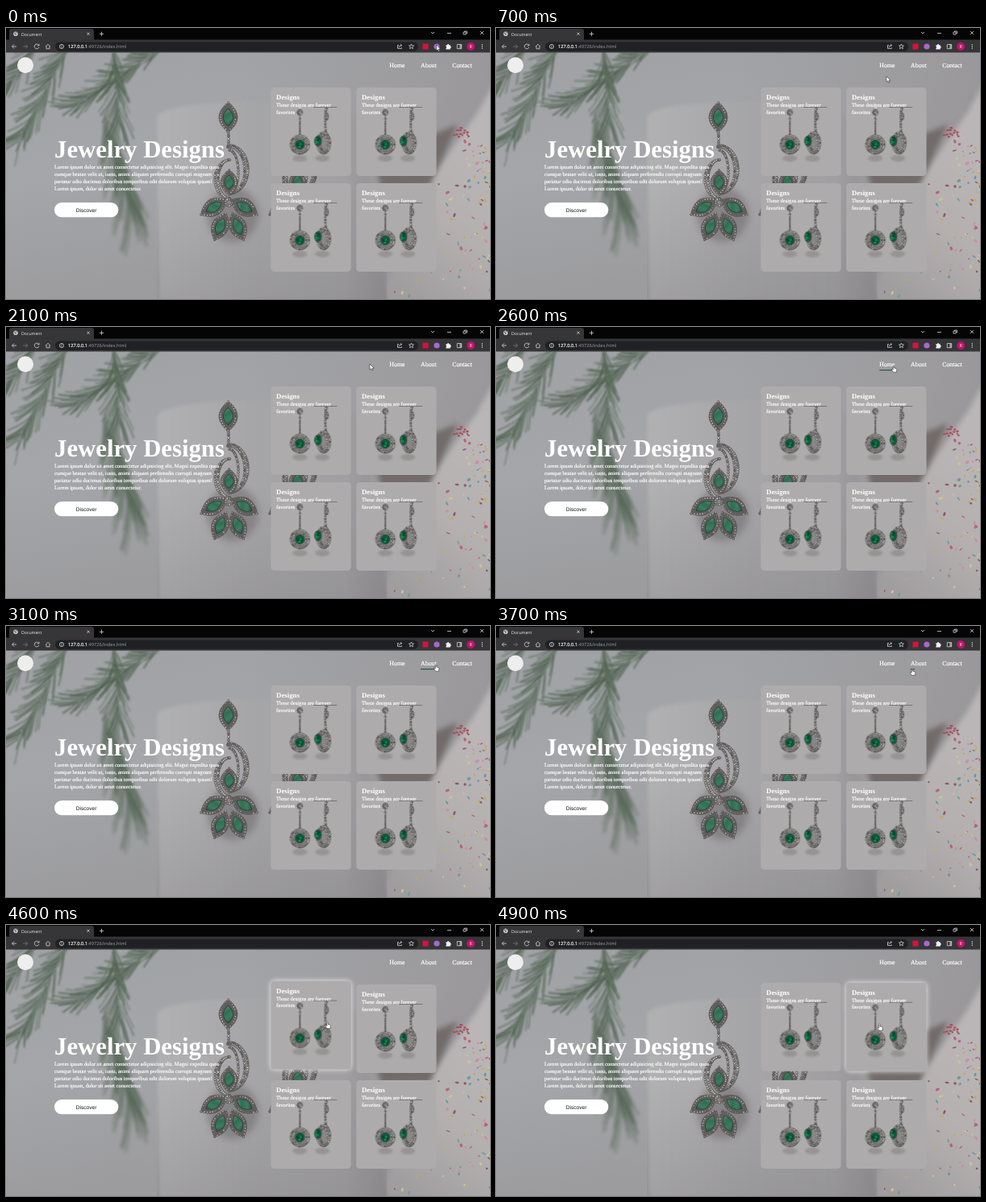
Write an HTML page with a canvas that moves like this. It is 600 px wide and 337 px high and loops after 5000 ms.

```html
<!DOCTYPE html>
<html lang="en">
<head>
<meta charset="utf-8">
<title>Jewelry Designs</title>
<style>
  html, body { margin: 0; width: 100%; height: 100%; overflow: hidden; background: #000; }
  canvas, svg { position: absolute; left: 0; top: 0; width: 600px; height: 337px; display: block; }
  text { text-rendering: geometricPrecision; white-space: pre; }
  .serif { font-family: "Liberation Serif", "Times New Roman", serif; fill: #fff; }
  .small { stroke: #fff; stroke-width: .18; }
  .ui { font-family: "Open Sans", "Noto Sans", sans-serif; fill: #f1f2f3; }
  .bold { font-weight: 700; }
  .line { fill: none; stroke: #d4d5d7; stroke-width: .8; }
</style>
</head>
<body>
<canvas id="page" width="600" height="337"></canvas>
<svg viewBox="0 0 600 337" width="600" height="337">
  <!-- browser frame -->
  <rect width="600" height="15" fill="#050506"/>
  <rect x="4" y="1" width="105" height="18" rx="3" fill="#363537"/>
  <rect y="14.5" width="600" height="16" fill="#363537"/>
  <circle cx="12" cy="7.2" r="2.8" fill="#c8cacd"/>
  <path d="M10 6l2 1v2M12.5 5l1.5 1.5" stroke="#363537" stroke-width=".8" fill="none"/>
  <text class="ui" x="19" y="9.5" font-size="5.2">Document</text>
  <path class="line" d="M100.4 5.6l3.2 3.2m0-3.2l-3.2 3.2M118.5 4.7v5.2M115.9 7.3h5.2"/>
  <path class="line" d="M527 5l2 2 2-2M547 6.5h5M567 5h3v3h-3zM568.5 5v-1h3v3h-1M588 4l4 4m0-4l-4 4"/>
  <path class="line" d="M13 23H7.5m2.6-2.6L7.5 23l2.6 2.6M40.5 21.2A2.9 2.9 0 1 0 40.9 24M41 19.8v2.1h-2.1M49 23.2l3-2.9 3 2.9M50 22.7v3.1h4v-3.1"/>
  <path class="line" style="stroke:#77797d" d="M21.3 23h5.5m-2.6-2.6l2.6 2.6-2.6 2.6"/>
  <rect x="61" y="17.4" width="450" height="11.4" rx="5.7" fill="#202124"/>
  <circle class="line" cx="69" cy="23" r="2.6"/>
  <path class="line" d="M69 22.6v1.9M69 21.2v.8"/>
  <text class="ui" x="77" y="25.1" font-size="5.7"><tspan stroke="#f1f2f3" stroke-width=".2">127.0.0.1</tspan><tspan fill="#9aa0a6">:49726/index.html</tspan></text>
  <path class="line" d="M487 21.4h-1.5v4h5v-1M487 24q.5-2.5 3.5-2.5m-1.3-1.4l1.5 1.4-1.5 1.4M502.5 20l1 2h2l-1.6 1.5.5 2.2-1.9-1.2-1.9 1.2.5-2.2-1.6-1.5h2z"/>
  <rect x="516.5" y="19.5" width="7" height="7" fill="#d8123f"/>
  <circle cx="534" cy="23" r="3.6" fill="#a767cf"/>
  <path d="M545.4 21.2h1.6a1.1 1.1 0 0 1 2.2 0h1.6v1.5a1.1 1.1 0 0 1 0 2.2v1.5h-5.4v-1.6a1.1 1.1 0 0 0 0-2.1z" fill="#f0f1f2"/>
  <path class="line" d="M559.3 20.5h5.4v5.2h-5.4zM563 20.5v5.2M564 20.5v5.2"/>
  <circle cx="576.2" cy="23" r="5" fill="#c5116d"/>
  <text class="ui" x="576.2" y="25" font-size="5.4" text-anchor="middle">R</text>
  <path d="M590.3 20.8v5" stroke="#d4d5d7" stroke-width="1.4" stroke-linecap="round" stroke-dasharray="0 2.2"/>

  <!-- page -->
  <circle cx="24" cy="46.3" r="10" fill="#eee"/>
  <g id="nav"></g>
  <text class="serif bold" x="60" y="161.3" font-size="30.75">Jewelry Designs</text>
  <g id="intro"></g>
  <rect x="60" y="217" width="79.3" height="18.3" rx="9.1" fill="#fff"/>
  <text x="99.6" y="228.6" font-size="6.6" text-anchor="middle" font-family="Liberation Sans, Arial, sans-serif" fill="#111">Discover</text>
  <g id="labels"></g>
  <g id="cursor" stroke="#222" stroke-width=".55" stroke-linejoin="round" fill="#fff">
    <path id="arrow" d="M0 0V7.2L1.7 5.7 2.8 8.2 4 7.7 2.9 5.2H5.1Z"/>
    <path id="hand" d="M-.7.6Q0-.6.7.6V3L3 3.6Q4 3.9 3.9 5L3.4 8.2H-.6L-2.6 5Q-2.8 4-1.8 4.2L-.7 5Z"/>
  </g>
</svg>
<script>
const LOOP = 5000, STEP = 100, TAU = Math.PI * 2;
const $ = id => document.getElementById(id);

// ---------- helpers ----------
let seed = 7;
function rnd(a = 0, b = 1) {
  seed = (seed * 16807) % 2147483647;
  return a + (b - a) * seed / 2147483647;
}
function paint(w, h, draw) {
  const c = document.createElement('canvas');
  c.width = w; c.height = h;
  draw(c.getContext('2d'));
  return c;
}
function svg(tag, attrs, parent, text) {
  const el = document.createElementNS('http://www.w3.org/2000/svg', tag);
  for (const k in attrs) el.setAttribute(k, attrs[k]);
  if (text) el.textContent = text;
  return parent.appendChild(el);
}
function oval(g, x, y, rx, ry, fill, rot = 0) {
  g.fillStyle = fill;
  g.beginPath(); g.ellipse(x, y, rx, ry, rot, 0, TAU); g.fill();
}
function ramp(g, x0, y0, x1, y1, ...stops) {
  const r = g.createLinearGradient(x0, y0, x1, y1);
  stops.forEach((c, i) => r.addColorStop(i / (stops.length - 1), c));
  return r;
}
function shape(g, d, fill) {
  g.fillStyle = fill;
  g.fill(new Path2D(d));
}

// ---------- jewels ----------
function stone(g, x, y, r) {
  const v = rnd(95, 205) | 0;
  oval(g, x, y, r, r, '#5b5857');
  oval(g, x - .2, y - .2, r * .6, r * .6, `rgb(${v},${v - 2},${v - 3})`);
}
function ring(g, x, y, rx, ry, r) {
  const n = Math.round((rx + ry) * 2 / r);
  for (let i = 0; i < n; i++) stone(g, x + rx * Math.cos(i / n * TAU), y + ry * Math.sin(i / n * TAU), r);
}
// string of stones from y0 to y1, bulging sideways by w
function bow(g, x, y0, y1, w, r) {
  const n = Math.ceil((y1 - y0 + Math.abs(w)) / r / 1.5);
  for (let i = 0; i <= n; i++) {
    const s = (1 - Math.cos(i / n * Math.PI)) / 2;
    stone(g, x + w * Math.sin(i / n * Math.PI), y0 + (y1 - y0) * s, r);
  }
}
function leaf(g, l, w, fill) {
  shape(g, `M0 ${-l}Q${2 * w} 0 0 ${l}Q${-2 * w} 0 0 ${-l}`, fill);
}
function gem(g, x, y, l, w, angle = 0) {
  g.save();
  g.translate(x, y); g.rotate(angle);
  leaf(g, l + 1, w + 1, '#625e5d');
  for (let i = 0; i <= 12; i++) {
    const s = i / 12, b = 3.4 * w * s * (1 - s);
    for (const side of [-1, 1]) stone(g, side * b, (2 * s - 1) * l, 1.4);
  }
  leaf(g, l * .64, w * .6, '#284438');
  leaf(g, l * .57, w * .52, ramp(g, -w / 2, -l / 2, w / 2, l / 2, '#5d8f78', '#2f6e51', '#3d7c60', '#265541'));
  g.restore();
}
function earring(g, dx) {
  g.save();
  g.translate(dx, 0);
  g.filter = 'blur(4px)';
  oval(g, 281, 232, 32, 34, 'rgba(95,93,97,.45)');
  g.filter = 'none';
  bow(g, 275, 128, 148, 1, 1.9);
  for (const w of [23, 19, 11]) bow(g, 277, 146 + (23 - w) / 2, 206, w, 1.8);
  for (const w of [-18, -14]) bow(g, 277, 164, 212, w, 1.8);
  gem(g, 275.5, 111, 18, 11);
  gem(g, 276.5, 192, 15, 10);
  for (const side of [-1, 1]) {
    gem(g, 276.5 + side * 19, 223, 18, 10, side * -1.05);
    gem(g, 276.5 + side * 11, 247, 18, 10, side * -.4);
  }
  ring(g, 276.5, 217, 4, 4, 1.8);
  g.restore();
}

// ---------- backdrop ----------
// pine branch: x, y, direction in degrees, length, needle length
function frond(g, x, y, deg, len, needle) {
  const dir = deg * Math.PI / 180;
  for (let s = 0; s < len; s += 2.2) {
    const a = dir + (rnd() < .5 ? -1 : 1) * rnd(.3, 1.4) * 16 / needle;
    const l = needle * rnd(.7, 1.15), v = rnd(-16, 20);
    const px = x + Math.cos(dir) * s, py = y + Math.sin(dir) * s;
    g.strokeStyle = `rgba(${86 + v},${103 + v},${86 + v},.72)`;
    g.lineWidth = rnd(1.1, 2.5);
    g.beginPath(); g.moveTo(px, py);
    g.quadraticCurveTo(px + Math.cos(a) * l / 2, py + Math.sin(a) * l / 2,
                       px + Math.cos(a + .12) * l, py + Math.sin(a + .12) * l);
    g.stroke();
  }
}
const photo = paint(600, 337, g => {
  g.fillStyle = ramp(g, 0, 31, 60, 337, '#9fa1a5', '#a5a6aa', '#9c9c9f');
  g.fillRect(0, 0, 600, 337);
  g.fillStyle = ramp(g, 300, 0, 600, 60, 'rgba(150,148,150,0)', 'rgba(150,147,150,.75)');
  g.fillRect(0, 0, 600, 337);

  // paper, and the dark thing lying on it
  g.filter = 'blur(3px)';
  shape(g, 'M610 60L584 106 525 190 460 345H610Z', ramp(g, 470, 310, 600, 150, '#a09d9f', '#b4b0b0', '#bab6b7'));
  shape(g, 'M560 120L530 132 460 180 466 200 525 196Z', '#726b69');

  // cup
  g.filter = 'blur(2px)';
  shape(g, 'M187 112C189 92 300 90 345 90S438 98 438 116L474 345H190Z',
    ramp(g, 186, 0, 478, 0, '#b1b0b2', '#acabad', '#a6a5a7', '#a3a2a4', '#a09fa1', '#8e8c90'));
  g.filter = 'none';
  g.fillStyle = ramp(g, 0, 200, 0, 337, 'rgba(120,118,122,0)', 'rgba(120,118,122,.28)');
  g.fillRect(187, 200, 285, 137);

  // pine, the hanging branch out of focus
  g.filter = 'blur(2px)';
  frond(g, 122, 110, 74, 120, 58);
  g.filter = 'blur(.9px)';
  frond(g, 78, 22, 118, 135, 36);
  frond(g, 196, 22, 146, 135, 34);
  frond(g, 40, 18, 125, 80, 34);
  frond(g, 132, 26, 84, 95, 38);

  // confetti and berries
  g.filter = 'blur(.6px)';
  const hues = ['#b9637a', '#c4ab5e', '#6a9a9c', '#8f5a66', '#c98fa2', '#cdc48f'];
  for (let i = 0; i < 90; i++) {
    const y = rnd(140, 337), x = 600 - rnd() * rnd() * (40 + (y - 140) * .5);
    oval(g, x, y, rnd(.8, 3), rnd(.7, 1.8), hues[i % 6], rnd(0, 3));
  }
  for (let i = 0; i < 14; i++) oval(g, rnd(548, 574), rnd(124, 136), rnd(1, 2), 1.2, '#a8505c');
  g.filter = 'none';

  earring(g, 85);
  earring(g, 0);
});

// ---------- product picture ----------
const product = paint(100, 110, g => {
  const green = (x, y, rx, ry) => {
    oval(g, x, y, rx + 1, ry + 1, '#4a514c');
    oval(g, x, y, rx, ry, '#0b5c3a');
    for (let i = 0; i < 8; i++)
      oval(g, x + rx * rnd(-.6, .6), y + ry * rnd(-.6, .6), 1, 1.2, i % 2 ? '#1f8f5c' : '#06432a');
  };
  g.filter = 'blur(1.2px)';
  for (const x of [36, 64]) oval(g, x, 88, 9, 4, 'rgba(125,123,125,.5)');
  g.filter = 'none';
  g.fillStyle = '#6f6c6d';
  g.fillRect(53, 24, 29, .9);
  g.fillRect(35.5, 27, .9, 32);
  ring(g, 36, 31, 2.6, 3, 1.4);
  bow(g, 36, 38, 58, 0, 1.2);
  bow(g, 69, 26, 58, -1.5, 1.6);
  ring(g, 69, 36, 1.8, 4, 1.2);
  oval(g, 36, 71, 10.5, 10.5, '#9d9b9c');
  for (const r of [11.2, 8]) ring(g, 36, 71, r, r, 1.45);
  green(36, 71, 5.4, 5.4);
  oval(g, 65.5, 69, 7.5, 13, '#8a8788');
  for (const r of [8, 4.5]) ring(g, 65.5, 69, r, r + 5, 1.45);
  green(58.5, 66.5, 3.8, 5.8);
});

// ---------- text, links and cards ----------
[
  'Lorem ipsum dolor sit amet consectetur adipisicing elit. Magni expedita quos',
  'cumque beatae velit ut, iusto, animi aliquam perferendis corrupti magnam',
  'pariatur odio ducimus doloribus temporibus odit dolorum voluptas ipsum!',
  'Lorem ipsum, dolor sit amet consectetur.'
].forEach((s, i) => svg('text', { class: 'serif small', x: 60, y: 175.3 + i * 8.75, 'font-size': 6.6 }, $('intro'), s));

let navX = 475.3;
const links = ['Home', 'About', 'Contact'].map(name => {
  const x = navX;
  const label = svg('text', { class: 'serif small', x, y: 49.2, 'font-size': 7.9 }, $('nav'), name);
  const w = label.getComputedTextLength();
  navX += w + 19.4;
  const bar = svg('rect', { x, y: 53.2, width: 0, height: 1, fill: '#0c4f3a' }, $('nav'));
  return { x, y: 40, w, h: 15, bar, time: 300 };
});
const cards = [0, 1, 2, 3].map(i => {
  const x = 328.3 + i % 2 * 105.9, y = 74 + (i >> 1) * 119;
  const label = svg('g', {}, $('labels'));
  const put = (s, dy, size, cls) => svg('text', { class: 'serif ' + cls, x: x + 6.8, y: y + dy, 'font-size': size }, label, s);
  put('Designs', 15.2, 8.8, 'bold');
  put('These designs are forever', 24.1, 6.6, 'small');
  put('favorites', 32.7, 6.6, 'small');
  return { x, y, w: 99.4, h: 110, label, time: 400 };
});
const targets = [...links, ...cards];

// ---------- motion ----------
const stops = [ // ms, x, y
  [0, 533.5, 21], [700, 484, 60], [1600, 167, 53], [2100, 451, 46], [2500, 485, 48], [3100, 533, 48],
  [3500, 570, 48], [4200, 381, 66], [4500, 380, 120], [4700, 417, 121], [4900, 475.5, 123], [LOOP, 533.5, 21]
];
function pointer(t) {
  const i = stops.findIndex(p => p[0] > t);
  const [t0, x0, y0] = stops[i - 1], [t1, x1, y1] = stops[i];
  const k = (t - t0) / (t1 - t0);
  return [x0 + (x1 - x0) * k, y0 + (y1 - y0) * k];
}
const hit = (o, [x, y]) => x >= o.x && x <= o.x + o.w && y >= o.y && y <= o.y + o.h;
const smooth = k => k * k * (3 - 2 * k);

// hover progress, gained or lost step by step
function level(o, step) {
  let v = 0;
  for (let i = 0; i <= step; i++) {
    v += (hit(o, pointer(i * STEP)) ? 1 : -1) * STEP / o.time;
    v = Math.max(0, Math.min(1, v));
  }
  return smooth(v);
}

const page = $('page').getContext('2d');
function render(step) {
  const at = pointer(step * STEP);
  page.drawImage(photo, 0, 0);
  for (const c of cards) {
    const lift = -4.4 * level(c, step);
    page.save();
    page.shadowColor = 'rgba(255,255,255,.85)';
    page.shadowBlur = hit(c, at) ? 6 : 0;
    page.fillStyle = '#adabac';
    page.beginPath(); page.roundRect(c.x, c.y + lift, c.w, c.h, 4.5); page.fill();
    page.restore();
    page.drawImage(product, c.x, c.y + lift);
    c.label.setAttribute('transform', `translate(0 ${lift})`);
  }
  for (const l of links) l.bar.setAttribute('width', l.w * level(l, step));
  const over = targets.some(o => hit(o, at));
  $('arrow').style.display = over ? 'none' : '';
  $('hand').style.display = over ? '' : 'none';
  $('cursor').setAttribute('transform', `translate(${at})`);
}

const start = performance.now();
let shown = -1;
function tick() {
  const step = Math.floor((performance.now() - start) % LOOP / STEP);
  if (step !== shown) render(shown = step);
  requestAnimationFrame(tick);
}
tick();
</script>
</body>
</html>
```
